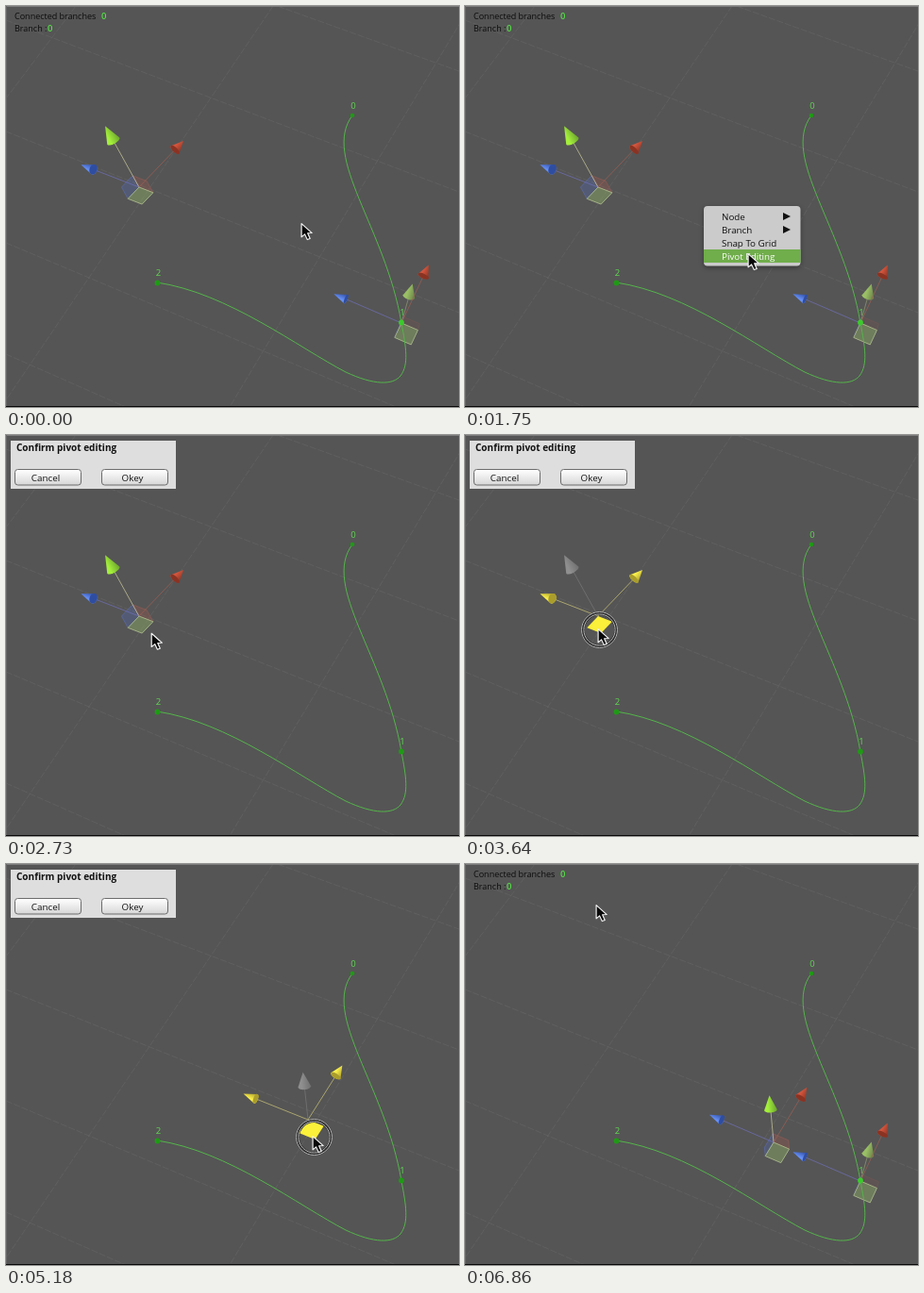
An HTML page with a canvas that plays this animation: 480 px wide and 425 px high, repeating every 6.93 s.

```html
<!DOCTYPE html>
<html lang="en">
<head>
<meta charset="utf-8">
<title>Pivot editing</title>
<style>
html, body { margin: 0; width: 100%; height: 100%; overflow: hidden; background: #555; }
canvas { display: block; }
</style>
</head>
<body>
<canvas id="stage" width="480" height="425"></canvas>
<script>
const c = document.getElementById('stage').getContext('2d');
const LOOP = 6930, STEP = 70;
const MENU_ON = 980, EDIT_ON = 2310, GRAB = 3290, RELEASE = 5740, EDIT_OFF = 6580;
const FONT = '"Open Sans", "Noto Sans", sans-serif';

const cursorStart = [314, 230];
const moves = [
  { from: 210, until: 840, to: [253, 212] },
  { from: 1120, until: 1680, to: [301, 262] },
  { from: 2170, until: 2850, to: [142, 205] },
  { from: 3640, until: 4410, to: [283, 264] },
  { from: 4410, until: 5180, to: [326, 288] },
  { from: 5180, until: 5530, to: [333, 312] },
  { from: 5810, until: 6440, to: [140, 43] }
];

// Vanishing points of the three world axes
const VANISH = { red: [814, -510], blue: [-417, -24], green: [352, 572] };

const COLORS = {
  blue: { light: '#6690f6', dark: '#2f4da0', line: 'rgba(110,110,180,.75)' },
  red: { light: '#d2553d', dark: '#8a3323', line: 'rgba(155,95,85,.75)' },
  green: { light: '#a4ee3c', dark: '#6ba52c', line: 'rgba(190,190,150,.8)' },
  dim: { light: '#9abf66', dark: '#687f45', line: 'rgba(150,155,115,.7)' },
  yellow: { light: '#fbf04c', dark: '#aa9d2c', line: '#aaa56f' },
  gray: { light: '#8f8f8f', dark: '#707070', line: '#6e6e6e' }
};

const clamp = u => Math.min(1, Math.max(0, u));
const ease = u => u * u * (3 - 2 * u);
const mix = (a, b, u) => a.map((v, i) => v + (b[i] - v) * u);
const add = (...ps) => ps.reduce((s, p) => [s[0] + p[0], s[1] + p[1]]);
const scale = (p, s) => [p[0] * s, p[1] * s];

function toward(a, b) {
  const d = add(b, scale(a, -1));
  return scale(d, 1 / Math.hypot(...d));
}

const cursorAt = t => moves.reduce(
  (p, m) => mix(p, m.to, ease(clamp((t - m.from) / (m.until - m.from)))), cursorStart);

// The pivot follows the pointer while held and settles on a slightly larger gap.
function pivotAt(t) {
  const held = cursorAt(Math.min(RELEASE, Math.max(3640, t), 5600));
  const gap = mix([1, 13], [6, 17], clamp((held[0] - 142) / 140));
  return add(held, scale(gap, -1));
}

function line(a, b, color) {
  c.strokeStyle = color;
  c.lineWidth = 1;
  c.beginPath();
  c.moveTo(...a);
  c.lineTo(...b);
  c.stroke();
}

function poly(points, fill, stroke) {
  c.beginPath();
  points.forEach(p => c.lineTo(...p));
  c.closePath();
  c.fillStyle = fill;
  c.fill();
  if (stroke) { c.strokeStyle = stroke; c.lineWidth = 1; c.stroke(); }
}

function circle([x, y], r, fill, stroke, width = 1) {
  c.beginPath();
  c.arc(x, y, r, 0, 7);
  if (fill) { c.fillStyle = fill; c.fill(); }
  if (stroke) { c.strokeStyle = stroke; c.lineWidth = width; c.stroke(); }
}

function text(str, x, y, color, size, weight = 400, align = 'left') {
  c.font = `${weight} ${size}px ${FONT}`;
  c.textAlign = align;
  c.fillStyle = color;
  c.fillText(str, x, y);
}

function box(x, y, w, h, r, fill, stroke) {
  c.beginPath();
  c.roundRect(x, y, w, h, r);
  c.fillStyle = fill;
  c.fill();
  if (stroke) { c.strokeStyle = stroke; c.lineWidth = 1; c.stroke(); }
}

function grid() {
  const color = 'rgba(255,255,255,.06)';
  c.setLineDash([7, 2]);
  for (let i = -2; i <= 2; i++) {
    line([0, 133 + 118 * i], [480, 325 + 128 * i], color);
    line([283 + 209 * i, 0], [242 * i - 5, 425], color);
  }
  c.setLineDash([]);
}

function arrow(origin, dir, reach, len, radius, depth, color, showBase) {
  line(origin, add(origin, scale(dir, reach - len)), color.line);
  c.save();
  c.translate(...add(origin, scale(dir, reach)));
  c.rotate(Math.atan2(dir[1], dir[0]));
  const shade = c.createLinearGradient(0, -radius, 0, radius);
  shade.addColorStop(.3, color.light);
  shade.addColorStop(1, color.dark);
  c.fillStyle = shade;
  c.beginPath();
  c.moveTo(0, 0);
  c.lineTo(-len, -radius);
  c.ellipse(-len, 0, depth, radius, 0, -Math.PI / 2, Math.PI / 2, true);
  c.fill();
  if (showBase) {
    c.fillStyle = color.dark;
    c.beginPath();
    c.ellipse(-len, 0, depth, radius, 0, 0, 7);
    c.fill();
  }
  c.restore();
}

function gizmo(o, { active = false, dim = false } = {}) {
  const k = (o[0] - 141) / 278;
  const red = toward(o, VANISH.red), blue = toward(o, VANISH.blue), green = toward(VANISH.green, o);
  const right = scale(blue, -16 - 3 * k), down = scale(red, -17), up = scale(green, 14 - 7 * k);
  const quad = (p, q) => [o, add(o, p), add(o, p, q), add(o, q)];
  const paint = name => active ? COLORS.yellow : COLORS[name];

  if (!active) {
    const alpha = dim ? .12 : .3;
    poly(quad(up, down), `rgba(80,105,190,${alpha})`, `rgba(95,115,195,${alpha * 1.7})`);
    poly(quad(up, right), `rgba(165,85,75,${alpha})`, `rgba(160,95,85,${alpha * 1.7})`);
  }
  arrow(o, green, 74 / (1 + .72 * k), 18 - 4 * k, 7.5 - k, 3, COLORS[active ? 'gray' : dim ? 'dim' : 'green']);
  arrow(o, blue, 66 + 12 * k, 14, 5.5 - k / 2, 4 - 2.5 * k, paint('blue'), true);
  arrow(o, red, 68, 13, 6, 2.5, paint('red'), true);
  if (active) poly(quad(right, down), '#fbf03a');
  else poly(quad(right, down), 'rgba(135,165,100,.5)', '#a3b087');
}

const curve = new Path2D('M367 116C334 160 402 235 419 336C424 362 427 380 418 392' +
  'C410 402 390 402 360 388C310 362 235 304 160 293');
const nodes = [[367, 116], [419, 335.5], [160.5, 293.5]];

function branch(editing) {
  c.strokeStyle = '#54b54b';
  c.lineWidth = 1;
  c.stroke(curve);
  nodes.forEach((p, i) => {
    circle(p, i ? 2.9 : 2.3, i === 1 && !editing ? '#3ccb2c' : '#1f9a15');
    text(i, p[0] + 1, p[1] - 7.5, '#60d853', 9.5, 400, 'center');
  });
}

function counters() {
  ['Connected branches', 'Branch :'].forEach((label, i) => {
    const y = 14 + 13 * i;
    text(label, 9, y, '#0c0c0c', 9);
    text('0', i ? 44 : 101, y, '#55e047', 9.5, 600);
  });
}

function menu(cursor) {
  c.save();
  c.shadowColor = 'rgba(0,0,0,.35)';
  c.shadowBlur = 5;
  c.shadowOffsetY = 2;
  box(253, 212, 102.5, 63.5, 4, '#cbcbcb');
  c.restore();
  const hover = Math.floor((cursor[1] - 216) / 14);
  ['Node', 'Branch', 'Snap To Grid', 'Pivot Editing'].forEach((label, i) => {
    const y = 216 + i * 14, lit = i === hover, color = lit ? '#fff' : '#111';
    if (lit) box(253, y, 102.5, 14, 0, '#70ad4b');
    text(label, 272, y + 10.5, color, 9.8);
    if (i < 2) poly([[337, y + 3], [345, y + 7], [337, y + 11]], color);
  });
}

function dialog() {
  box(5, 6, 175, 51, 0, '#dedede');
  text('Confirm pivot editing', 11, 16.5, '#111', 10, 700);
  const fill = c.createLinearGradient(0, 37, 0, 53);
  fill.addColorStop(0, '#fff');
  fill.addColorStop(1, '#d6d6d6');
  ['Cancel', 'Okey'].forEach((label, i) => {
    const x = 9.5 + 92 * i;
    box(x, 36.5, 70, 16.5, 3, fill, '#6c6c6c');
    text(label, x + 32.5, 48.5, '#111', 9.8, 400, 'center');
  });
}

function ring(cursor) {
  const center = add(cursor, [.5, 1.5]);
  circle(center, 17.6, null, '#2a2a2a', 4);
  circle(center, 19, null, '#b5b5b5');
  circle(center, 16.6, null, '#b5b5b5');
}

function pointer([x, y]) {
  c.save();
  c.translate(x - 1.5, y);
  c.scale(1.17, 1.1);
  c.lineJoin = 'round';
  poly([[.5, .5], [.5, 13.5], [3.5, 10.8], [5.8, 16], [8.3, 15], [6.1, 9.8], [10, 9.6]], '#080808', '#f4f4f4');
  c.restore();
}

function draw(t) {
  const cursor = cursorAt(t);
  const editing = t >= EDIT_ON && t < EDIT_OFF;
  const active = t >= GRAB && t < RELEASE;

  c.fillStyle = '#555';
  c.fillRect(0, 0, 480, 425);
  grid();
  if (!editing) gizmo([419, 336], { dim: true });
  branch(editing);
  gizmo(pivotAt(t), { active });
  if (editing) dialog();
  else counters();
  if (t >= MENU_ON && t < EDIT_ON) menu(cursor);
  if (active) ring(cursor);
  pointer(cursor);

  box(0, 0, 480, 1, 0, '#7c7c7c');
  box(0, 0, 1, 424, 0, '#666');
  box(0, 424, 480, 1, 0, '#0a0a0a');
}

const start = performance.now();
function tick() {
  const t = (performance.now() - start) % LOOP;
  draw(Math.floor(t / STEP) * STEP);
  requestAnimationFrame(tick);
}
tick();
</script>
</body>
</html>
```
